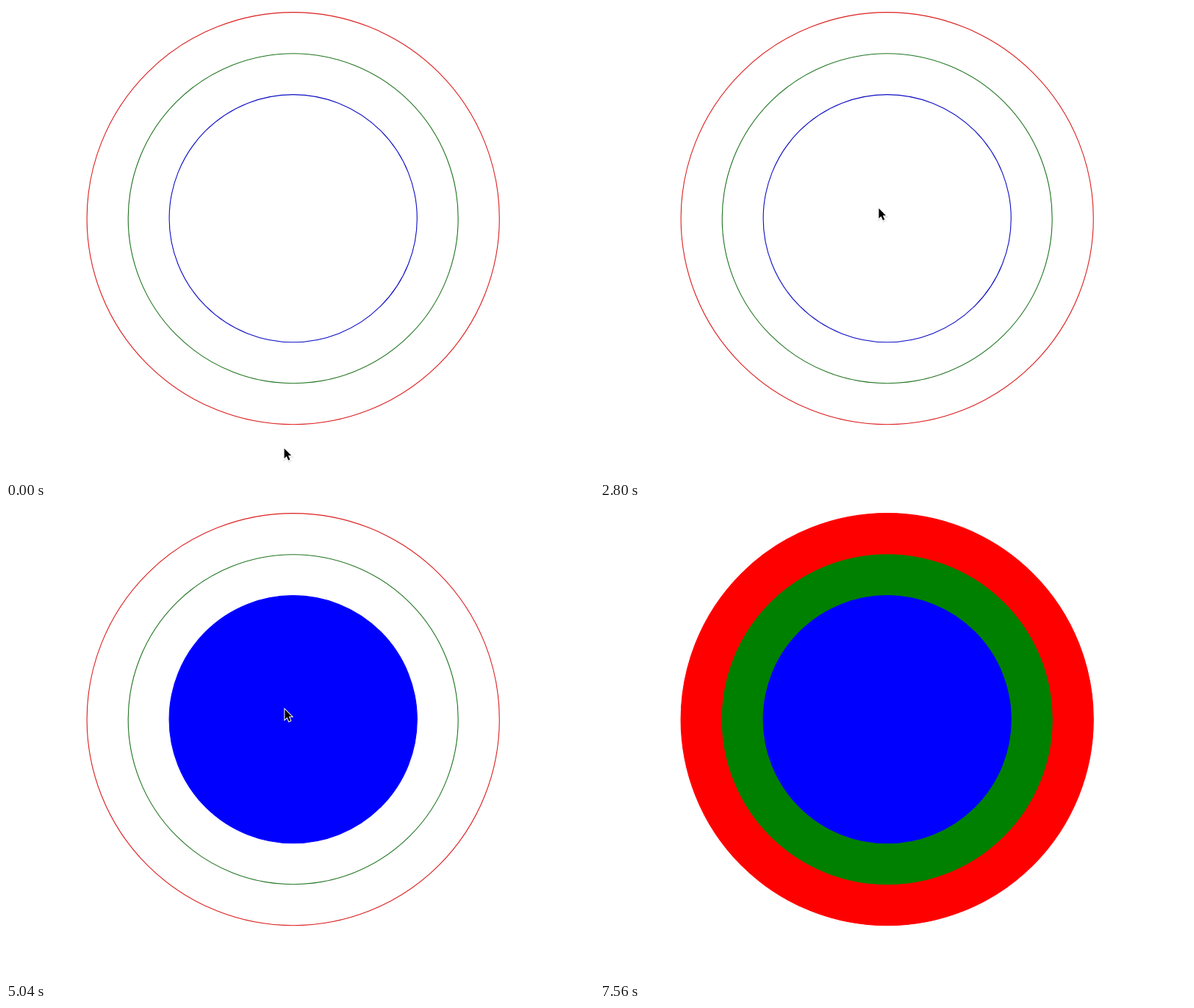
Recreate the animation shown at these times as an HTML page. Size 800 by 644 pixels, loop 7.98 s.

```html
<!DOCTYPE html>
<html lang="en">
<head>
<meta charset="utf-8">
<title>Bubbling circles</title>
<style>
  html, body { margin: 0; width: 100%; height: 100%; overflow: hidden; background: #fff; }
  svg { display: block; width: 800px; height: 644px; }
</style>
</head>
<body>
<svg viewBox="0 0 800 644">
  <!-- Outermost first; the click bubbles from the last circle to the first -->
  <g id="targets" stroke-width="1.1">
    <circle cx="390.7" cy="289.2" r="280.6" data-line="#dc1e1e" data-fill="red"/>
    <circle cx="390.7" cy="289.2" r="224.5" data-line="#207420" data-fill="green"/>
    <circle cx="390.7" cy="289.2" r="168.6" data-line="#0c0cc4" data-fill="blue"/>
  </g>
  <circle id="ripple" cx="378.2" cy="275.8" fill="none" stroke="#3c78f0" stroke-width="1.2"/>
  <g id="cursor">
    <path id="arrow" d="M0 0V13.6L3.1 10.6L5.6 16.2L7.8 15.2L5.4 9.7H9.5Z" fill="none"
          stroke="#000" stroke-opacity=".1" stroke-width="3" transform="translate(.3 1.2)"/>
    <path d="M0 0V13.6L3.1 10.6L5.6 16.2L7.8 15.2L5.4 9.7H9.5Z" fill="#000"
          stroke="#fff" stroke-width="2" paint-order="stroke"/>
  </g>
</svg>
<script>
const LOOP = 7980;
const STEP = 70;
const PRESS = { start: 3570, length: 280 };
const FIRST_FILL = 4620;
const FILL_DELAY = 1000;

// Cursor tip as [time, x, y]
const path = [
  [0, 378.6, 602.4], [140, 378.6, 602.4], [770, 345.6, 594.6], [1680, 345.6, 594.6],
  [2030, 352, 612], [2590, 379.4, 275.6], [5040, 379.4, 275.6], [5600, 386, 660]
];

const targets = [...document.querySelectorAll("#targets circle")].reverse();
const ripple = document.getElementById("ripple");
const cursor = document.getElementById("cursor");

const smooth = p => p * p * (3 - 2 * p);

function cursorAt(t) {
  const next = path.findIndex(([time]) => time > t);
  if (next < 0) return path[path.length - 1].slice(1);
  const [t0, x0, y0] = path[next - 1];
  const [t1, x1, y1] = path[next];
  const p = smooth((t - t0) / (t1 - t0));
  return [x0 + (x1 - x0) * p, y0 + (y1 - y0) * p];
}

function draw(t) {
  targets.forEach((target, i) => {
    const { line, fill } = target.dataset;
    const filled = t >= FIRST_FILL + i * FILL_DELAY;
    target.setAttribute("fill", filled ? fill : "none");
    target.setAttribute("stroke", filled ? fill : line);
  });

  const p = (t - PRESS.start) / PRESS.length;
  const pressed = p >= 0 && p < 1;
  ripple.setAttribute("r", pressed ? 15 + 40 * p : 0);
  ripple.setAttribute("opacity", pressed ? 0.8 * (1 - p) : 0);

  cursor.setAttribute("transform", `translate(${cursorAt(t)})`);
}

function frame() {
  const t = performance.now() % LOOP;
  draw(Math.floor(t / STEP) * STEP);
  requestAnimationFrame(frame);
}
frame();
</script>
</body>
</html>
```
